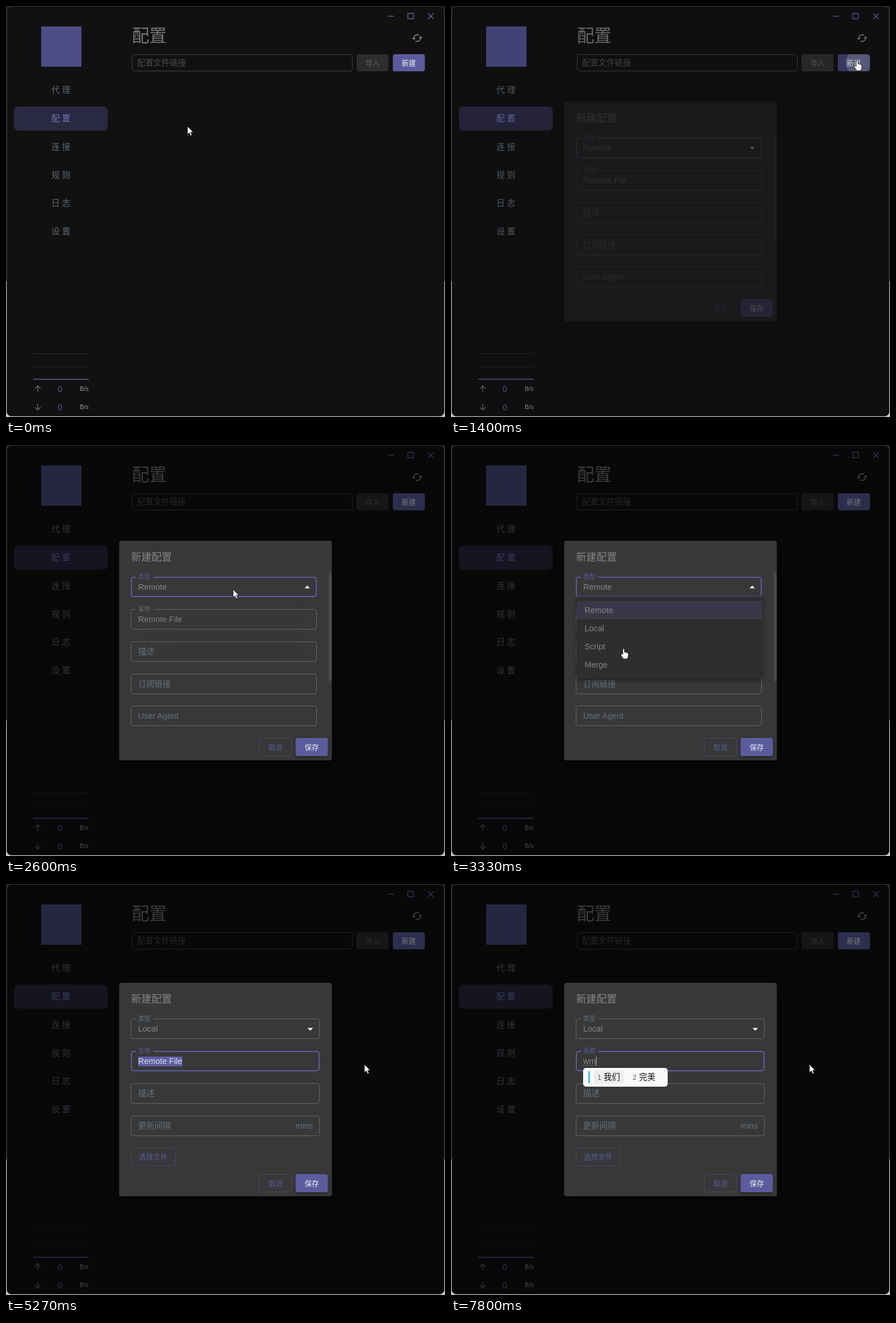
An HTML page that plays this animation: 774x724 px, repeating every 8000 ms.

```html
<!DOCTYPE html>
<html lang="zh">
<head>
<meta charset="utf-8">
<style>
html, body { margin: 0; width: 100%; height: 100%; overflow: hidden; background: #111 }
svg { display: block; width: 774px; height: 724px; font-family: "Liberation Sans", "Noto Sans CJK SC", "Noto Sans CJK", sans-serif }
text { white-space: pre }
#dialog > .panel { filter: drop-shadow(0 8px 14px #0007) }
#menu > .panel { filter: drop-shadow(0 3px 4px #0007) }
</style>
</head>
<body>
<svg id="stage" viewBox="0 0 774 724"></svg>
<script>
const PRIMARY = '#5b5c9d', LABEL = '#647280', VALUE = '#858585', PANEL = '#383838';

const box = (x, y, w, h, fill, r = 0, more = '') =>
  `<rect x="${x}" y="${y}" width="${w}" height="${h}" rx="${r}" fill="${fill}" ${more}/>`;
// y is the vertical middle of the line
const text = (x, y, s, fill, size = 14.4, more = '') =>
  `<text x="${x}" y="${y + size * .37}" font-size="${size}" fill="${fill}" ${more}>${s}</text>`;
const line = (d, color, w = 1.5, more = '') =>
  `<path d="${d}" fill="none" stroke="${color}" stroke-width="${w}" ${more}/>`;
const group = (id, s) => `<g id="${id}">${s}</g>`;
const button = (x, y, w, h, s, fill, color, more = '') =>
  box(x, y, w, h, fill, 4, more) + text(x + w / 2, y + h / 2, s, color, 12.6, 'text-anchor="middle"');

function field(y, w, label, value, focus) {
  const frame = focus
    ? box(221, y + 1, w - 1, 34, 'none', 4, `stroke="${PRIMARY}" stroke-width="2"`)
    : box(220.5, y + .5, w, 35, 'none', 4, 'stroke="#686868"');
  if (value === undefined) return frame + text(233, y + 18, label, LABEL);
  return frame + box(229, y - 1, 31, 4, PANEL) +
    text(233, y, label, focus ? PRIMARY : LABEL, 10.8) + text(233, y + 18, value, VALUE);
}
const actions = y =>
  button(446.5, y + .5, 57, 31, '取消', 'none', PRIMARY, 'stroke="#47476f"') +
  button(510.5, y, 57, 32, '保存', PRIMARY, '#eee', 'style="filter:drop-shadow(0 2px 2px #0006)"');

function sidebar() {
  const items = ['代理', '配置', '连接', '规则', '日志', '设置'].map((s, i) =>
    text(80, 148 + i * 49.7, s, i === 1 ? '#7273b8' : '#5d6977', 14.8, 'letter-spacing="4"')).join('');
  const rate = (y, dir) =>
    line(`M56 ${y - 5.5 * dir}V${y + 5.5 * dir}M51 ${y - .3 * dir}L56 ${y - 5.5 * dir}L61 ${y - .3 * dir}`, '#626262') +
    text(95, y, '0', PRIMARY, 14.4, 'text-anchor="middle"') + text(130, y, 'B/s', '#9a9a9a', 10.8);
  return box(62, 36, 71, 71, '#4d4d86') + box(14, 177, 165.5, 42.5, '#2a2942', 8) + items +
    line('M48 612.5H146M48 635.5H146', '#292929', 1) + line('M48 657.5H146', PRIMARY, 1.3) +
    rate(674.5, 1) + rate(706.5, -1);
}

const windowBase =
  box(0, 0, 774, 724, '#242424') + box(0, 485, 774, 239, '#c8c8c8') +
  box(1.5, .5, 771, 722, '#111', 8, 'stroke="#3b3b3b"') + sidebar() +
  line('M673 18H684M708.5 13H718.5V22.5H708.5ZM744 13L754 23M754 13L744 23', PRIMARY) +
  text(222, 52, '配置', '#777', 30.6) +
  `<path transform="translate(714.9 46.4) scale(.84)" fill="#858585" d="M19 8l-4 4h3c0 3.3-2.7 6-6 6-1 0-2-.25-2.8-.7l-1.46 1.46C9 19.5 10.4 20 12 20c4.4 0 8-3.6 8-8h3zM6 12c0-3.3 2.7-6 6-6 1 0 2 .25 2.8.7l1.46-1.46C15 4.5 13.6 4 12 4c-4.4 0-8 3.6-8 8H1l4 4 4-4z"/>` +
  box(222.5, 85.5, 388, 29, 'none', 4, 'stroke="#444"') + text(231, 100, '配置文件链接', '#4c4c4c') +
  button(618, 85, 56.5, 30, '导入', '#2d2d2d', '#5e5e5e') +
  box(682, 85, 56.5, 30, PRIMARY, 4) + box(682, 85, 56.5, 30, '#40406e', 4, 'id="hover"') +
  text(710, 100, '新建', '#eee', 12.6, 'text-anchor="middle"') +
  '<clipPath id="newClip"><rect x="682" y="85" width="56.5" height="30" rx="4"/></clipPath>' +
  '<g clip-path="url(#newClip)"><circle id="ripple" cx="718" cy="100" fill="#fff"/></g>';

const remote =
  text(220.5, 197, '新建配置', VALUE, 18) + field(232, 327, '类型', 'Remote', true) +
  `<path id="arrow" fill="#eee" d="M526.5 248H536L531.2 253Z"/>` +
  field(289, 327, '名称', 'Remote File') + field(346, 327, '描述') +
  field(403, 327, '订阅链接') + field(459, 327, 'User Agent') +
  box(569, 225, 5, 191, '#4b4b4b', 2) + actions(516);

const local =
  text(220.5, 202, '新建配置', VALUE, 18) +
  group('typeOn', field(237, 332, '类型', 'Local', true)) + group('typeOff', field(237, 332, '类型', 'Local')) +
  '<path fill="#eee" d="M531.5 253.5H541.5L536.5 258.5Z"/>' +
  group('nameOn', field(294, 332, '名称', '', true)) + group('nameOff', field(294, 332, '名称', '')) +
  box(233, 304, 78, 17, '#5d5fa6', 0, 'id="mark"') +
  '<text id="typed" x="233" y="317.3" font-size="14.4"></text>' +
  line('M233 319.5H255', '#999', 1, 'id="under" stroke-dasharray="1 1"') + box(0, 304, 1, 16, '#bbb', 0, 'id="caret"') +
  field(351, 332, '描述') + field(408, 332, '更新间隔') + text(510.5, 426, 'mins', LABEL) +
  button(220.5, 464.5, 78, 32, '选择文件', 'none', PRIMARY, 'stroke="#47476f"') + actions(511);

const menu =
  '<rect class="panel" x="222" y="267" width="327" height="144" rx="4" fill="#2e2e2e"/>' +
  box(222, 275, 327, 32, '#393848', 0, 'id="picked"') +
  '<clipPath id="rowClip"><rect x="222" y="307" width="327" height="32"/></clipPath>' +
  '<g clip-path="url(#rowClip)"><circle id="rowRipple" cx="321" cy="331" fill="#fff" opacity=".055"/></g>' +
  ['Remote', 'Local', 'Script', 'Merge'].map((s, i) => text(235.5, 291 + i * 32, s, '#858585')).join('');

const ime =
  box(233, 324, 149, 33, '#fafafa', 5) + box(242, 329, 3, 22, '#4fb8d8', 1.5) + box(251.5, 328, 54, 24, '#efedef', 3) +
  text(258, 340, '1', '#666', 13) + text(269, 340, '我们', '#111', 14.6) +
  text(320, 340, '2', '#666', 13) + text(331.5, 340, '完美', '#111', 14.6);

const pointers =
  '<path id="pArrow" fill="#fff" stroke="#111" stroke-width=".8" d="M0 0V14.2L3.3 11.2L5.6 16.4L8 15.3L5.7 10.3H10Z"/>' +
  '<path id="pHand" fill="#fff" stroke="#111" stroke-width=".8" d="M-1.6 1Q0 -1 1.4 1V6.3Q3 5.2 4 6.8Q5.6 6 6.4 7.6Q8.2 7.2 8.3 9V12Q8 15 6.3 18H-.5Q-2.5 15.5 -4.7 11.5Q-5 9 -3 9L-1.6 10.4Z"/>' +
  '<path id="pText" fill="none" stroke="#ccc" stroke-width="1.2" d="M-3-7.5H-.8L0-7L.8-7.5H3M0-7V7M-3 7.5H-.8L0 7L.8 7.5H3"/>';

const stage = document.getElementById('stage');
stage.innerHTML = windowBase + box(2, 1, 770, 721, '#000', 8, 'id="shade"') +
  group('dialog', `<rect class="panel" id="panel" x="199.5" width="375" rx="4" fill="${PANEL}"/>` +
    group('remote', remote) + group('local', local)) +
  group('menu', menu) + group('ime', ime) + group('pointer', pointers);
const el = id => document.getElementById(id);
const set = (id, name, v) => el(id).setAttribute(name, v);
const show = (id, on) => set(id, 'visibility', on ? 'inherit' : 'hidden');

const clamp = x => Math.min(1, Math.max(0, x));
// cubic-bezier(.4, 0, .2, 1)
function ease(x) {
  x = clamp(x);
  let lo = 0, hi = 1;
  for (let i = 0; i < 20; i++) {
    const s = (lo + hi) / 2, q = 1 - s;
    if (1.2 * q * q * s + .6 * q * s * s + s ** 3 < x) lo = s; else hi = s;
  }
  return 3 * (1 - lo) * lo * lo + lo ** 3;
}

// time, x, y
const path = [
  [67, 320, 212], [867, 716, 96], [1470, 716, 96], [2067, 498, 271], [2333, 400.5, 254.5],
  [2800, 400.5, 254.5], [3200, 296, 374], [3533, 320, 331], [4467, 320, 331],
  [4733, 347, 312], [4800, 347, 312], [5067, 30, 316], [5267, 632, 318]
];
function pointerAt(t) {
  const i = path.findIndex(p => p[0] > t);
  if (i < 0) return path[path.length - 1].slice(1);
  if (i === 0) return path[0].slice(1);
  const a = path[i - 1], b = path[i], u = (t - a[0]) / (b[0] - a[0]), k = u * u * (3 - 2 * u);
  return [a[1] + (b[1] - a[1]) * k, a[2] + (b[2] - a[2]) * k];
}
const typing = [[0, 'Remote File'], [6460, 'w'], [6530, 'wm'], [7060, 'w'], [7330, ''], [7595, 'w'], [7660, 'wm']];

function draw(t) {
  const isLocal = t > 4060, named = t > 4860;
  const [x, y] = pointerAt(t);
  const inside = (l, top, r, bottom) => x >= l && x <= r && y >= top && y <= bottom;

  // New button and dialog fade
  const onNew = inside(682, 85, 738, 115);
  const leaving = t > 1470 ? 1 - clamp((t - 1600) / 200) : 0;
  set('hover', 'opacity', onNew ? 1 : leaving);
  set('ripple', 'r', 42 * ease((t - 1200) / 550));
  set('ripple', 'opacity', t < 1260 ? 0 : .2 * (1 - clamp((t - 1500) / 500)));
  const fade = ease((t - 1340) / 225);
  set('shade', 'opacity', fade * .5);
  set('dialog', 'opacity', fade);
  set('panel', 'y', isLocal ? 174 : 168.5);
  set('panel', 'height', isLocal ? 376 : 387);
  show('remote', !isLocal);
  show('local', isLocal);
  set('arrow', 'transform', t > 2590 ? 'rotate(180 531.2 250.2)' : '');

  // Drop-down list
  const open = ease((t - 2540) / 220), close = ease((t - 4067) / 195);
  const grow = .75 + .25 * open;
  set('menu', 'opacity', open ** 2 * (1 - close));
  set('menu', 'transform', `translate(384 272) scale(${grow} ${grow ** 2}) translate(-384 -272)`);
  set('picked', 'y', isLocal ? 307 : 275);
  set('rowRipple', 'r', isLocal ? 66 + (t - 4067) * .7 : 0);

  // Name field
  show('typeOn', !named);
  show('typeOff', named);
  show('nameOn', named);
  show('nameOff', !named);
  const value = typing.filter(k => k[0] <= t).pop()[1];
  const markFrom = t > 5060 ? 233 : Math.max(233, Math.min(311, x));
  const marked = named && t < 6460;
  set('mark', 'x', markFrom);
  set('mark', 'width', marked ? 311 - markFrom : 0);
  el('typed').textContent = value;
  set('typed', 'fill', marked && markFrom < 270 ? '#ddd' : VALUE);
  set('caret', 'x', 233 + [0, 10.5, 22.5][Math.min(2, value.length)]);
  show('caret', (t > 6460 && t < 7130) || t > 7595);
  show('under', t > 7660);
  show('ime', t > 7725);

  // Pointer
  const dragging = t > 4800 && t < 5130;
  const hand = onNew || (t > 2000 && t < 2540 && inside(221, 233, 548, 268)) ||
    (t > 2800 && t < 4260 && inside(222, 275, 549, 403));
  const beam = dragging || (t > 4540 && inside(221, 295, 553, 330));
  set('pointer', 'transform', `translate(${x} ${y})`);
  show('pHand', hand);
  show('pText', beam && !hand);
  show('pArrow', !hand && !beam);
}

const start = performance.now();
function tick() {
  const t = (performance.now() - start) % 8000;
  draw(Math.floor((t + 5) * .015) / .015); // 15 steps a second
  requestAnimationFrame(tick);
}
tick();
</script>
</body>
</html>
```
